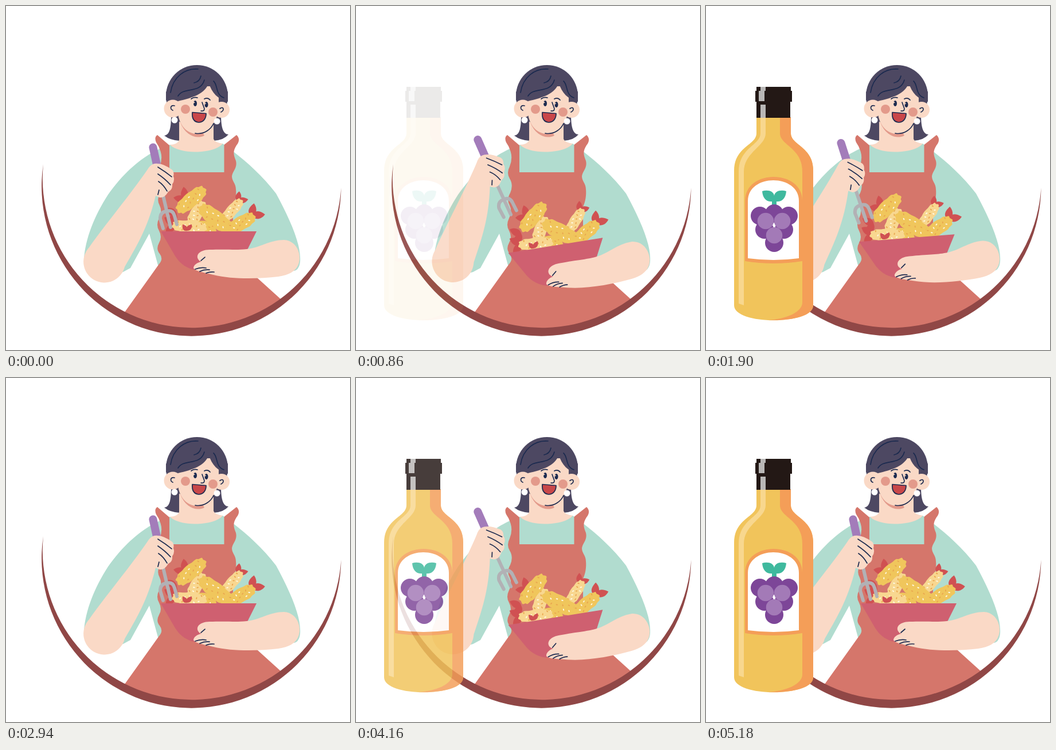
These frames come from a looping animation (600x600 px, 6000 ms). An HTML page:

```html
<!DOCTYPE html>
<html lang="en">
<head>
<meta charset="utf-8">
<title>Cooking</title>
<style>
  html, body { margin: 0; height: 100%; overflow: hidden; background: #fff; }
  svg { display: block; width: 100vw; height: 100vh; }
  .line { fill: none; stroke: #1b2a4f; stroke-width: 1.7; stroke-linecap: round; stroke-linejoin: round; }
  .skin { fill: #fad9c6; }
  .hair { fill: #4d4862; }
  .teal { fill: #b1dccf; }
  .apron { fill: #d5766b; }
  .blush { fill: #e39a8b; }
  .steel { fill: none; stroke: #b2b1b5; stroke-width: 6; stroke-linecap: round; }
  .orange { fill: #f49e58; }
  .shine { fill: #f8d78e; }
  .cap { fill: #231815; }
  .gray { fill: #b9b7b6; }
</style>
</head>
<body>
<svg viewBox="0 0 600 600">
  <!-- body -->
  <path class="teal" d="M286 242C250 254 213 280 178 329C154 366 138 407 136 442L180 470L204 464L217 457L250 397L265 452H420L500 462C510 462 514 452 513 438C512 408 492 366 471 327C442 289 408 262 378 240Z"/>
  <path class="apron" d="M264 225L285 243V290H380.500V242L402 225C408 230 407 237 402 243C395 254 397 260 401 270C404 283 395 288 394 297C394 306 401 309 401 320C402 330 400 342 396 350V436L480 512A261 261 0 0 1 207 534L267 450Q275 441 268 432Q261 424 267 413Q273 403 267 392Q261 382 267 370Q273 358 268 348Q262 338 269 326Q275 312 268 301Q262 291 268 280Q274 265 269 252Q267 245 262 238Q258 229 264 225Z"/>
  <path fill="#904746" d="M65 276A261.180 261.180 0 1 0 584.500 317A260.590 260.590 0 1 1 65 276Z"/>

  <!-- head -->
  <path class="hair" d="M288 190C288 211 286 225 276 226Q286 234 302 235H362Q380 234 388 224C379 224 375 212 375 190Z"/>
  <path class="skin" d="M302 195V234Q298 242 286 242C302 259 362 259 378 240Q364 238 362 232V195Z"/>
  <path class="blush" d="M304 203C313 226 332 233 346 226L340 215Z"/>
  <circle class="hair" cx="333" cy="157" r="54"/>
  <circle class="skin" cx="291" cy="179" r="15.5"/>
  <circle class="skin" cx="376" cy="181" r="14"/>
  <path class="skin" d="M300 150V188C303 211 318 223 333 223C352 223 368 205 371 178V140H320Z"/>
  <path class="hair" d="M279 165C290 160 296 160 300 166C326 160 347 153 354 134C358 151 370 163 387 167V150L370 118H300L279 150Z"/>
  <path class="line" d="M287 151C291 124 312 108 335 110M300 157C310 140 339 154 346 129M328 134Q338 132 340 122M362 131C370 138 365 155 380 160M294 174C286 172 286 180 291 182M373 179C380 174 381 182 375 185M323 162Q328 158 334 160M346 162Q352 159 356 164M342 168L346 179Q346 184 340 183M330 222C346 225 358 214 362 205"/>
  <path class="line" style="fill:#c9474a" d="M325 185.500L349 187.500C349 198 343 203 336 203C328 202 324 196 325 185.500Z"/>
  <g fill="#1b2a4f">
    <ellipse cx="330" cy="170" rx="3" ry="5"/>
    <ellipse cx="349.5" cy="172" rx="3" ry="5"/>
  </g>
  <path d="M327 167l3 1-3 2zM346.500 169l3 1-3 2z" class="skin"/>
  <circle class="blush" cx="313" cy="180" r="8"/>
  <circle class="blush" cx="361" cy="185" r="8"/>
  <circle fill="#fff" cx="294" cy="199" r="5.500"/>
  <circle fill="#fff" cx="368" cy="201" r="5.500"/>

  <g id="bowlArm">
    <g id="food"></g>
    <path fill="#cf6070" d="M270 393H437L420 427L400 462H340C316 460 304 450 295 436Z"/>
    <path class="skin" d="M355 425C390 424 400 426 420 424C442 422 460 408 485 408C503 409 513 425 512 442C510 460 497 469 475 472C440 476 395 477 362 469C345 465 329 462 327 457C327 452 334 447 341 446C335 444 332 438 335 433C338 428 346 425 355 425Z"/>
    <path class="line" d="M347 438L340 444M330 459Q340 455 349 457M338 463Q346 459 355 460M349 466Q356 463 363 464"/>
  </g>

  <g id="forkArm">
    <path stroke="#a37cba" stroke-width="14" stroke-linecap="round" d="M256.500 246.500L266 290"/>
    <path class="steel" d="M272 322L287 386M274 388L269 371Q269 359 280 358Q291 355 294 366L298 381"/>
    <path class="skin" d="M145 421C170 385 220 325 247 285Q254 273 265 275Q274 275 289 285Q294 289 292 297Q295 304 290 311Q291 320 283 324Q277 335 268 334L261 331C248 385 230 415 207 455A36.500 36.500 0 1 1 145 421Z"/>
    <path class="line" d="M265 281Q278 289 289 298M265 293Q277 301 287 312M266 306Q275 312 281 323M267 321L265 329"/>
  </g>

  <g id="bottle">
    <path fill="#f1c45b" d="M88 194V222C88 243 49 245 49 287V522C49 557 187 557 187 522V287C187 245 148 243 148 222V194Z"/>
    <path class="orange" d="M129 194V222C129 243 168 247 168 289V517C168 534 140 546 108 548C150 549 187 541 187 522V287C187 245 148 243 148 222V194Z"/>
    <path class="shine" d="M95 194V222C95 243 57 247 57 289V519L66 522V289C66 255 104 245 104 222V194Z"/>
    <path class="cap" d="M88 141H148V148H150V167H147V195H88V167H86V148H88Z"/>
    <path class="gray" d="M95 141H104V148H102V166H92V148H95ZM95 172H104V195H95Z"/>
    <path class="orange" d="M68 445V340C68 284 168 284 168 340V445Q118 453 68 445Z"/>
    <path fill="#fff" d="M73 440V340C73 292 162 292 162 340V440Q118 446 73 440Z"/>
    <path fill="#3fb99e" d="M98 323C108 320 118 323 119 331C120 323 130 320 140 323C139 336 132 342 123 341V349H115V341C106 342 99 336 98 323Z"/>
    <g id="grapes"></g>
  </g>
</svg>
<script>
const $ = id => document.getElementById(id);

let seed = 7;
const random = () => (seed = seed * 16807 % 2147483647) / 2147483647;

const YELLOW = '#f0c65c', LIGHT = '#f8d790';

// Bumpy fried piece with sesame specks
function piece(x, y, length, width, angle, color) {
  const power = v => Math.sign(v) * Math.abs(v) ** 0.75;
  let outline = '', specks = '';
  for (let i = 0; i < 72; i++) {
    const a = i * Math.PI / 36, bump = 1 + 0.04 * Math.sin(a * 11);
    outline += `${(length / 2 * power(Math.cos(a)) * bump).toFixed(1)},${(width / 2 * power(Math.sin(a)) * bump).toFixed(1)} `;
  }
  const count = 11;
  for (let i = 0; i < count; i++) {
    const sx = ((i + 0.5) / count - 0.5) * length * 0.75;
    const sy = ((i * 2 % 5) / 4 - 0.5) * width * 0.55 + random() * 2 - 1;
    const fill = i % 2 ? '#fffbe8' : '#e9a64f';
    specks += `<ellipse cx="${sx}" cy="${sy}" rx="1.9" ry="1" fill="${fill}" transform="rotate(${random() * 180} ${sx} ${sy})"/>`;
  }
  return `<g transform="translate(${x} ${y}) rotate(${angle})"><polygon points="${outline}" fill="${color}"/>${specks}</g>`;
}

// Two-petal shrimp tail opening towards the given angle
function tail(x, y, angle, size = 1) {
  const petal = turn => `<path transform="rotate(${turn})" d="M0 0C4 -9 12 -9 21 0C14 7 5 7 0 0Z"/>`;
  return `<g fill="#d05152" transform="translate(${x} ${y}) rotate(${angle}) scale(${size})">${petal(-36)}${petal(36)}</g>`;
}

$('food').innerHTML = [
  tail(314, 337, -137, 1.05), tail(298, 364, 175, 1.05), tail(295, 380, 175, 1.05),
  tail(405, 341, -48, 0.85), tail(429, 367, -45, 1.1),
  piece(345, 387, 44, 24, 10, YELLOW),
  piece(320, 385, 60, 21, 5, LIGHT),
  piece(395, 356, 48, 19, -48, LIGHT),
  piece(333, 361, 46, 22, -58, LIGHT),
  piece(366, 371, 70, 27, 38, YELLOW),
  piece(410, 379, 54, 24, -30, YELLOW),
  piece(323, 338, 62, 25, -40, YELLOW),
  tail(316, 392, -90, 0.65)
].join('');

const circles = (points, r, fill) =>
  points.map(([x, y]) => `<circle cx="${x}" cy="${y}" r="${r}" fill="${fill}"/>`).join('');

$('grapes').innerHTML =
  circles([[94, 366], [119, 362], [144, 366], [102, 390], [136, 390], [119, 413]], 16, '#7d4698') +
  circles([[104, 375], [133, 375], [119, 400]], 14.3, '#a37ab7');

const ramp = (t, from, to) => Math.min(1, Math.max(0, (t - from) / (to - from)));

const LOOP = 6000, CYCLE = 2940;

function draw(now) {
  const time = now % LOOP;
  const t = time < CYCLE ? time : time - CYCLE;
  const swing = ramp(t, 0, 680) - ramp(t, 1540, 2240);
  $('forkArm').setAttribute('transform', `rotate(${-11.5 * swing} 168 459)`);
  $('bowlArm').setAttribute('transform', `rotate(${-9.2 * swing} 503 440)`);
  $('bottle').setAttribute('opacity', ramp(t, 820, 1300));
}

const start = performance.now();
function tick() {
  draw(performance.now() - start);
  requestAnimationFrame(tick);
}
tick();
</script>
</body>
</html>
```
